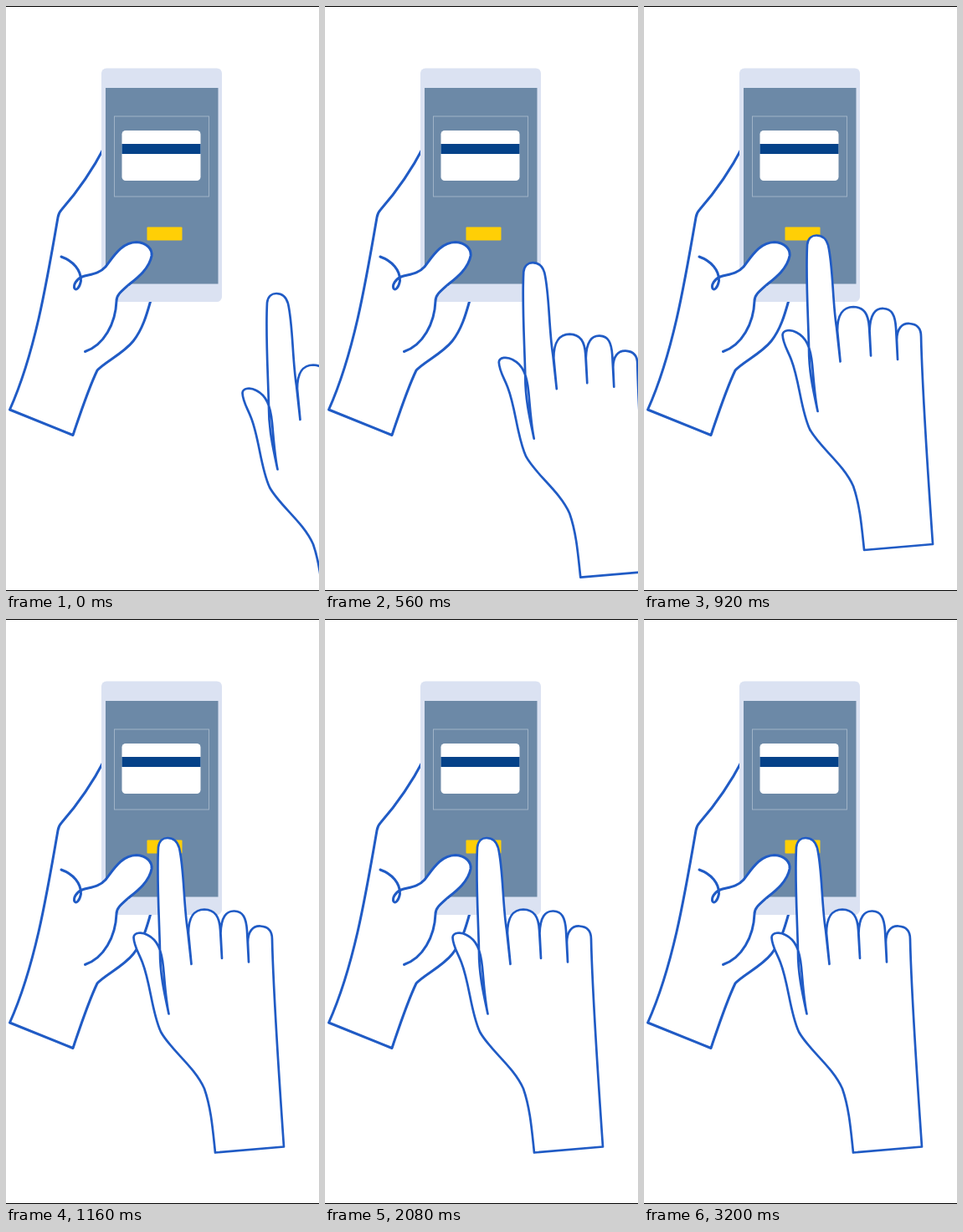
Write an HTML page without scripts that moves like this. It is 374 by 700 pixels and loops after 3.32 s.

```html
<!DOCTYPE html>
<html lang="en">
<head>
<meta charset="utf-8">
<title>Paying by phone</title>
<style>
  @property --u {
    syntax: "<number>";
    inherits: false;
    initial-value: 0;
  }
  html, body {
    margin: 0;
    width: 100%;
    height: 100%;
    overflow: hidden;
    background: #fff;
  }
  svg {
    display: block;
    width: 374px;
    height: 700px;
  }
  .line {
    fill: #fff;
    stroke: #205bc5;
    stroke-width: 3;
    stroke-linecap: round;
    stroke-linejoin: round;
  }
  /* The hand glides along a shallow arc, 25 positions per second */
  .tap {
    stroke-width: 2.7;
    --u: 0;
    transform: translate(
      calc((130 - 149 * var(--u) + 19 * var(--u) * var(--u)) * 1px),
      calc((82 - 52.4 * var(--u) - 29.6 * var(--u) * var(--u)) * 1px));
    animation: glide 3320ms -1ms infinite;
  }
  @keyframes glide {
    0% { --u: 0; animation-timing-function: steps(26); }
    31.3253%, 100% { --u: 1; }
  }
  .flash {
    fill: #fff;
    opacity: 0;
    animation: flash 3320ms -1ms infinite;
  }
  @keyframes flash {
    0%, 36.1446% { opacity: 0; animation-timing-function: steps(11); }
    49.3976% { opacity: .25; animation-timing-function: steps(11); }
    62.6506%, 100% { opacity: 0; }
  }
</style>
</head>
<body>
<svg viewBox="0 0 374 700">
  <path class="line" d="M118 168C104 195 88 219 67 243Q63 247 62 253C48 335 34 417 4.500 483L80 513.500C89 487 98 459 109 436C118 426 140 416 152 401C163 387 168 370 173 352"/>

  <g id="phone">
    <rect x="114" y="74.500" width="144" height="279.500" rx="6" fill="#dbe2f2"/>
    <rect x="119" y="98" width="134.500" height="234.500" fill="#6c89a7"/>
    <rect x="129.500" y="132" width="113" height="96" fill="none" stroke="#a6b8cb" stroke-width=".9"/>
    <rect x="138.500" y="149" width="94" height="60" rx="4.500" fill="#fff"/>
    <rect x="138.500" y="165" width="94" height="12" fill="#044289"/>
    <rect x="168.500" y="264.500" width="42" height="16" rx="1" fill="#ffcf06"/>
    <rect class="flash" x="119" y="98" width="134.500" height="234.500"/>
  </g>

  <path class="line" d="M66 300C80 305 90 316 89.500 329C88 337 84 341 82 338C80 334 84 327 91 324C100 321 111 321 119 312C129 299 138 283 156 282.500C168 283 175 291 174 299C171 315 156 326 146 334C137 342 132 346 132 353C131 380 117 406 94.500 413.500"/>

  <path class="line tap" d="M250 638.500C247 610 245 585 237 562C225 535 197 516 185 494C174 470 173 437 163 411C159 400 153 392 152.500 381C153 375 162 374 169 378C181 384 186 396 188 417C190 438 191 456 194.500 472.500C189 447 184 425 184 398C183 355 180 310 182 273C183 265 188 262 193 262C201 262 205 267 207 274C213 300 212 340 217 372L221.500 413L218 376C218 357 225 347.500 237 347.500C250 348 255 356 256 372L258 406L256.500 376C257 357 263 349 273 349.500C283 350 287 357 288 373L290 410.500L289 387C289 374 295 367 304 367.500C313 368 318 373 318 383C319 430 326 545 332 631.500Z"/>

  <path d="M0 .5H374M0 699.500H374" stroke="#000"/>
</svg>
</body>
</html>
```
